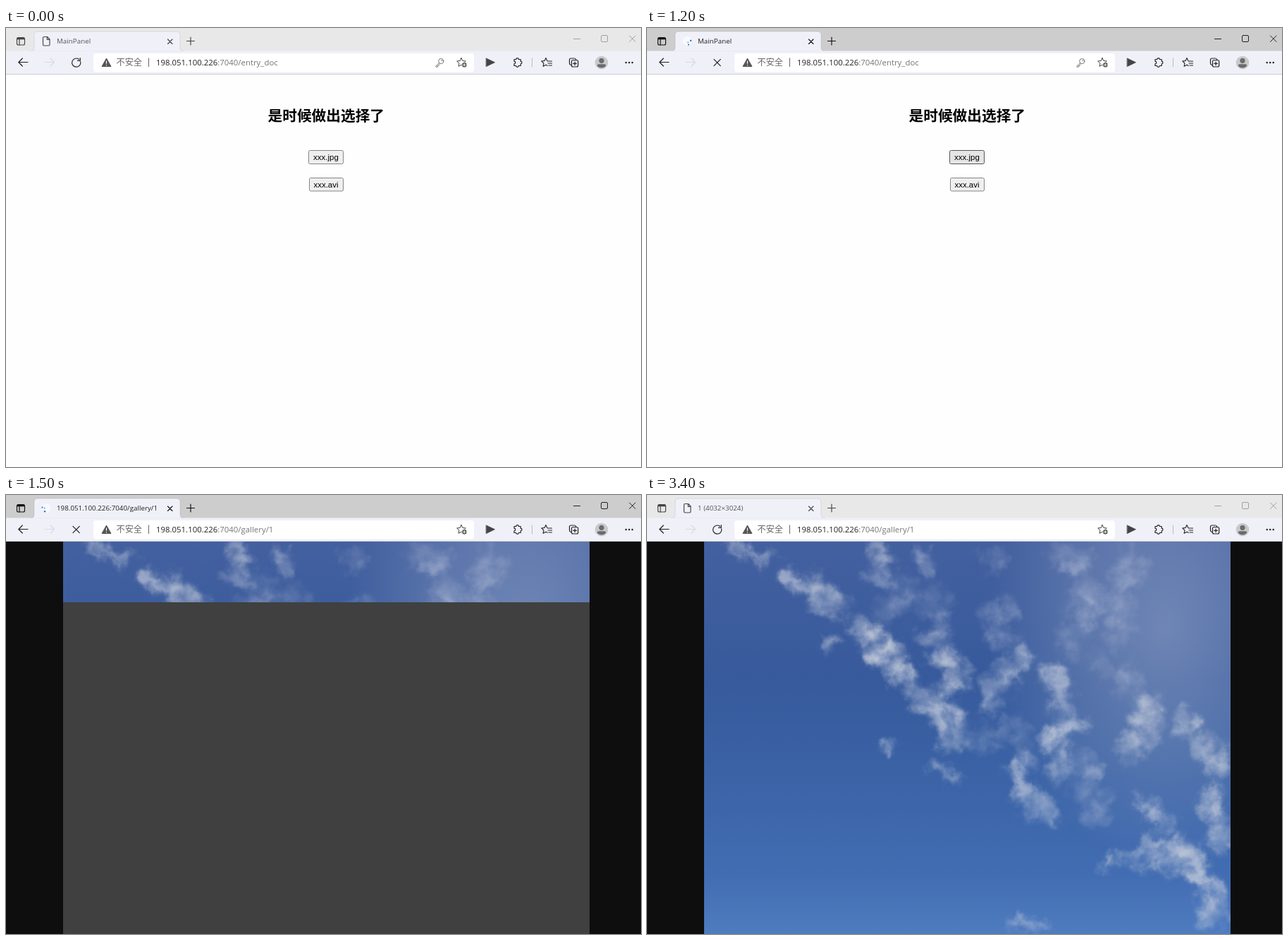
Recreate the animation shown at these times as an HTML page. Size 901 by 622 pixels, loop 3.5 s.

```html
<!DOCTYPE html>
<html lang="zh">
<head>
<meta charset="utf-8">
<style>
  html, body { margin: 0; width: 100%; height: 100%; overflow: hidden; background: #fff; }
  svg { display: block; }
  .ui { font-family: "Open Sans", "Noto Sans", sans-serif; }
  .cjk { font-family: "Noto Sans CJK SC", "Noto Sans CJK", sans-serif; }
  .btn { font: 11.5px "Liberation Sans", Arial, sans-serif; text-anchor: middle; }
  .line { fill: none; stroke-linecap: round; stroke-linejoin: round; }
</style>
</head>
<body>
<svg width="901" height="622" viewBox="0 0 901 622">
  <defs>
    <linearGradient id="sky" x1="0" y1="0" x2="0" y2="1">
      <stop offset="0" stop-color="#43609f"/>
      <stop offset=".35" stop-color="#375a9c"/>
      <stop offset=".6" stop-color="#3b63a6"/>
      <stop offset=".85" stop-color="#426db2"/>
      <stop offset="1" stop-color="#4f7bbf"/>
    </linearGradient>
    <radialGradient id="haze">
      <stop offset="0" stop-color="#a3b0cd" stop-opacity=".5"/>
      <stop offset=".5" stop-color="#a3b0cd" stop-opacity=".28"/>
      <stop offset="1" stop-color="#a3b0cd" stop-opacity="0"/>
    </radialGradient>
    <filter id="puff" filterUnits="userSpaceOnUse" x="41" y="26" width="830" height="640" color-interpolation-filters="sRGB">
      <feGaussianBlur stdDeviation="5" result="soft"/>
      <feTurbulence type="fractalNoise" baseFrequency=".04" numOctaves="5" seed="8" result="noise"/>
      <feDisplacementMap in="soft" in2="noise" scale="36" xChannelSelector="R" yChannelSelector="G" result="torn"/>
      <feColorMatrix in="noise" values="0 0 0 0 0  0 0 0 0 0  0 0 0 0 0  0 0 1.6 0 0" result="holes"/>
      <feComposite in="torn" in2="holes" operator="in"/>
    </filter>
    <clipPath id="photoBox"><rect x="81" y="66" width="747" height="556"/></clipPath>
  </defs>

  <!-- Page with the two choices -->
  <g id="page">
    <rect y="66" width="901" height="556" fill="#fefefe"/>
    <text class="cjk" x="371.5" y="131.5" font-size="20.7" font-weight="700">是时候做出选择了</text>
    <rect id="jpg" x="429.5" y="173.5" width="49" height="19" rx="2"/>
    <text class="btn" x="454" y="187">xxx.jpg</text>
    <rect x="430.5" y="212.5" width="48" height="18.5" rx="2" fill="#efefef" stroke="#858585"/>
    <text class="btn" x="454" y="225.5">xxx.avi</text>
  </g>

  <!-- Picture viewer -->
  <g id="viewer">
    <rect y="66" width="901" height="556" fill="#0e0e0e"/>
    <g clip-path="url(#photoBox)">
      <rect x="81" y="66" width="747" height="556" fill="url(#sky)"/>
      <ellipse cx="735" cy="190" rx="250" ry="330" fill="url(#haze)"/>
      <g id="clouds" fill="#c3cada" filter="url(#puff)"/>
    </g>
    <rect id="pending" x="81" width="747" fill="#404040"/>
  </g>

  <!-- Tab strip -->
  <rect id="strip" width="901" height="33"/>
  <path d="M34 33Q40 33 40 27V10Q40 5 45 5H242Q247 5 247 10V27Q247 33 253 33Z" fill="#f0f0f9" stroke="#000" stroke-opacity=".09"/>
  <g id="tabInk" class="line" stroke-width="1.15">
    <rect x="15.5" y="13.5" width="11" height="10.5" rx="2"/>
    <path d="M16 15H26" stroke-width="2.6" stroke-linecap="butt"/>
    <path d="M19 15V24M229.5 16L236 22.5M236 16L229.5 22.5M256.5 18.5H267.5M262 13V24"/>
    <path id="doc" d="M54 12.5H58.5L62 16V23.5Q62 25 60.5 25H54Q52.5 25 52.5 23.5V14Q52.5 12.5 54 12.5ZM58.3 12.8V16.3H61.8"/>
  </g>
  <g id="spinner">
    <circle cx="57" cy="18.5" r="6.5" fill="#f8f9fd"/>
    <g id="spinDots" fill="#2678b8">
      <circle cx="51.6" cy="17.6" r="1.1"/><circle cx="55" cy="23.2" r="1.2"/><circle cx="54.8" cy="18.6" r=".8"/>
    </g>
  </g>
  <text id="title" class="ui" x="72" y="22" font-size="9.8"></text>
  <path id="winInk" class="line" d="M805.5 15.5H814.5M846 10.5H852Q853.5 10.5 853.5 12V18Q853.5 19.5 852 19.5H846Q844.5 19.5 844.5 18V12Q844.5 10.5 846 10.5ZM884.5 11L893 19.5M893 11L884.5 19.5"/>

  <!-- Toolbar -->
  <rect y="32.5" width="901" height="33.5" fill="#f0f0f9"/>
  <path d="M0 65.5H901" stroke="#cfcfd6"/>
  <rect x="124" y="36" width="540" height="26.5" rx="4" fill="#fff"/>
  <g class="line" stroke="#222" stroke-width="1.2">
    <path d="M31 48.5H17.8M23.3 43L17.8 48.5L23.3 54"/>
    <path d="M55 48.5H68.5M63 43L68.5 48.5L63 54" stroke="#d9d9e0"/>
    <path id="reload" d="M105.7 47.8A6.1 6.1 0 1 1 103.5 44.3M105.3 42.5V46.3H101.5"/>
    <path id="stop" d="M95 44.3L104.3 53.6M104.3 44.3L95 53.6"/>
    <g id="key" stroke="#777" stroke-width="1">
      <circle cx="617.3" cy="47" r="3.6"/>
      <path d="M614.5 49.5L610 54V55.2H612.3V53.6H614V52L615.5 50.5"/><circle cx="618.3" cy="46" r=".4"/>
    </g>
    <g stroke="#444" stroke-width="1"><path class="star" transform="translate(646 49)"/></g>
    <circle cx="650.3" cy="52.3" r="3.7" fill="#555" stroke="#fff" stroke-width=".7"/>
    <path d="M648.6 52.3H652M650.3 50.6V54" stroke="#fff" stroke-width=".9"/>
    <path d="M681.5 43L693.5 48.7L681.5 54.5Z" fill="#444" stroke="#444" stroke-width=".8"/>
    <path d="M721 44.5H723.8A1.8 1.8 0 0 1 727.4 44.5H730.2V47.2A1.8 1.8 0 0 1 730.2 50.8V53.5H727.4A1.8 1.8 0 0 1 723.8 53.5H721V50.8A1.8 1.8 0 0 0 721 47.2Z"/>
    <path d="M746.5 43V55" stroke="#bbb" stroke-width="1"/>
    <g stroke-width="1.1"><path class="star" transform="translate(766 49)"/></g>
    <path d="M768.5 46V56H775V46Z" fill="#f0f0f9" stroke="none"/>
    <path d="M768.5 47H774.5M769.5 50H774.5M770 53H774.5"/>
    <path d="M801.5 52.5Q799.5 52 799.5 50V45Q799.5 43 801.5 43H806.5Q808.5 43 808.8 45"/>
    <rect x="802.5" y="45.5" width="9.2" height="9.5" rx="2"/>
    <path d="M804.7 50.3H809.5M807.1 47.9V52.7"/>
  </g>
  <circle cx="845" cy="49" r="9.3" fill="#c9c9cb"/>
  <circle cx="845" cy="46.3" r="3.6" fill="#6b6b6b"/>
  <path d="M838.8 53.5Q838.8 51.3 841 51.3H849Q851.2 51.3 851.2 53.5Q849 56.4 845 56.4Q841 56.4 838.8 53.5Z" fill="#6b6b6b"/>
  <path id="menu" class="line" d="M879.7 49h0m4.5 0h0m4.5 0h0" stroke-width="2.5"/>
  <path d="M142.5 43L149 54.5H136Z" fill="#555" stroke="#555" stroke-linejoin="round"/>
  <path d="M142.5 46.5V50.8M142.5 52.2V53.5" stroke="#fff" stroke-width="1.2"/>
  <text class="cjk" x="156.5" y="53" font-size="12.2" fill="#666">不安全</text>
  <path d="M202.5 42.5V55" stroke="#666"/>
  <text class="ui" x="213" y="53" font-size="11.4" fill="#222"><tspan id="host"></tspan><tspan id="path" fill="#757575"></tspan></text>
</svg>
<script>
const LOOP = 3500;
const HOST = "198.051.100.226";
const PORT = ":7040";
const SVG = "http://www.w3.org/2000/svg";
const $ = id => document.getElementById(id);
const setAll = (el, attrs) => {
  for (const name in attrs) el.setAttribute(name, attrs[name]);
  return el;
};
const make = (tag, attrs) => setAll(document.createElementNS(SVG, tag), attrs);
const set = (id, attrs) => setAll($(id), attrs);
const show = (id, on) => set(id, { display: on ? "inline" : "none" });

const starPath = () => {
  const points = Array.from({ length: 10 }, (_, i) => {
    const a = i * Math.PI / 5 - Math.PI / 2, r = i % 2 ? 3.2 : 6.6;
    return (r * Math.cos(a)).toFixed(2) + " " + (r * Math.sin(a)).toFixed(2);
  });
  return "M" + points.join("L") + "Z";
};
document.querySelectorAll(".star").forEach(s => s.setAttribute("d", starPath()));

let seed = 7;
const random = () => (seed = seed * 16807 % 2147483647) / 2147483647;
const jitter = size => (random() - .5) * size;

// Scatter soft puffs along streaks of cloud
function scatter(d, size, opacity) {
  const streak = make("path", { d });
  const length = streak.getTotalLength();
  for (let s = 0; s <= length; s += size * .4) {
    const p = streak.getPointAtLength(s);
    $("clouds").append(make("ellipse", {
      cx: p.x + jitter(size), cy: p.y + jitter(size),
      rx: size * (.4 + random() * .5), ry: size * (.4 + random() * .5), opacity
    }));
  }
}
// Veils, banks, tufts, wisps
scatter("M590 75L625 150L600 215M685 80L655 200M650 250L700 280M345 150L405 140M485 85V110M500 160V210M620 370L630 460M460 345L530 330", 27, .17);
scatter("M205 128L262 148M300 180L350 235L372 285M405 200L435 275M395 290L430 340M322 80V110M765 325L810 380M715 290L695 370M695 505L770 510L812 595M805 420L815 490", 25, .42);
scatter("M505 265L530 225M480 275V300M540 365L525 405L575 462M575 240L592 320L585 390M620 315L575 345M705 430L740 470M385 88L400 100", 18, .36);
scatter("M410 388L440 402M335 352L355 358M652 520L668 526M520 602L560 614M250 212L268 208M120 76L175 90", 9, .4);

function draw(t) {
  const active = t >= 1200 && t < 3400;
  const moved = t >= 1300;
  const loading = t >= 1200 && t < 1600;
  const hover = t >= 1000;

  set("strip", { fill: active ? "#cdcdcd" : "#e8e8e8" });
  set("tabInk", { stroke: active ? "#111" : "#444" });
  set("winInk", { stroke: active ? "#222" : "#a0a0a0" });
  set("title", { fill: active ? "#222" : "#555" });
  set("menu", { stroke: t >= 400 && t < 600 ? "#333" : "#222" });
  set("jpg", { fill: hover ? "#e5e5e5" : "#efefef", stroke: hover ? "#555" : "#858585" });

  $("title").textContent = t >= 1600 ? "1 (4032×3024)"
    : moved ? HOST + PORT + "/gallery/1" : "MainPanel";
  $("host").textContent = HOST;
  $("path").textContent = PORT + (moved ? "/gallery/1" : "/entry_doc");

  show("doc", !loading);
  show("spinner", loading);
  const turn = Math.min(0, Math.floor(t / 100) - 14) * 60;
  set("spinDots", { transform: `rotate(${turn} 57 18.5)` });
  show("reload", !loading);
  show("stop", loading);
  show("key", !moved);

  const edge = t < 1600 ? 152 : t < 1800 ? 511 : 622;
  show("page", t < 1500);
  show("viewer", t >= 1500);
  set("pending", { y: edge, height: 622 - edge });
}

const start = performance.now();
let last = -1;
function tick() {
  const t = (performance.now() - start) % LOOP;
  const step = Math.floor(t / 100);
  if (step !== last) draw(step * 100);
  last = step;
  requestAnimationFrame(tick);
}
tick();
</script>
</body>
</html>
```
